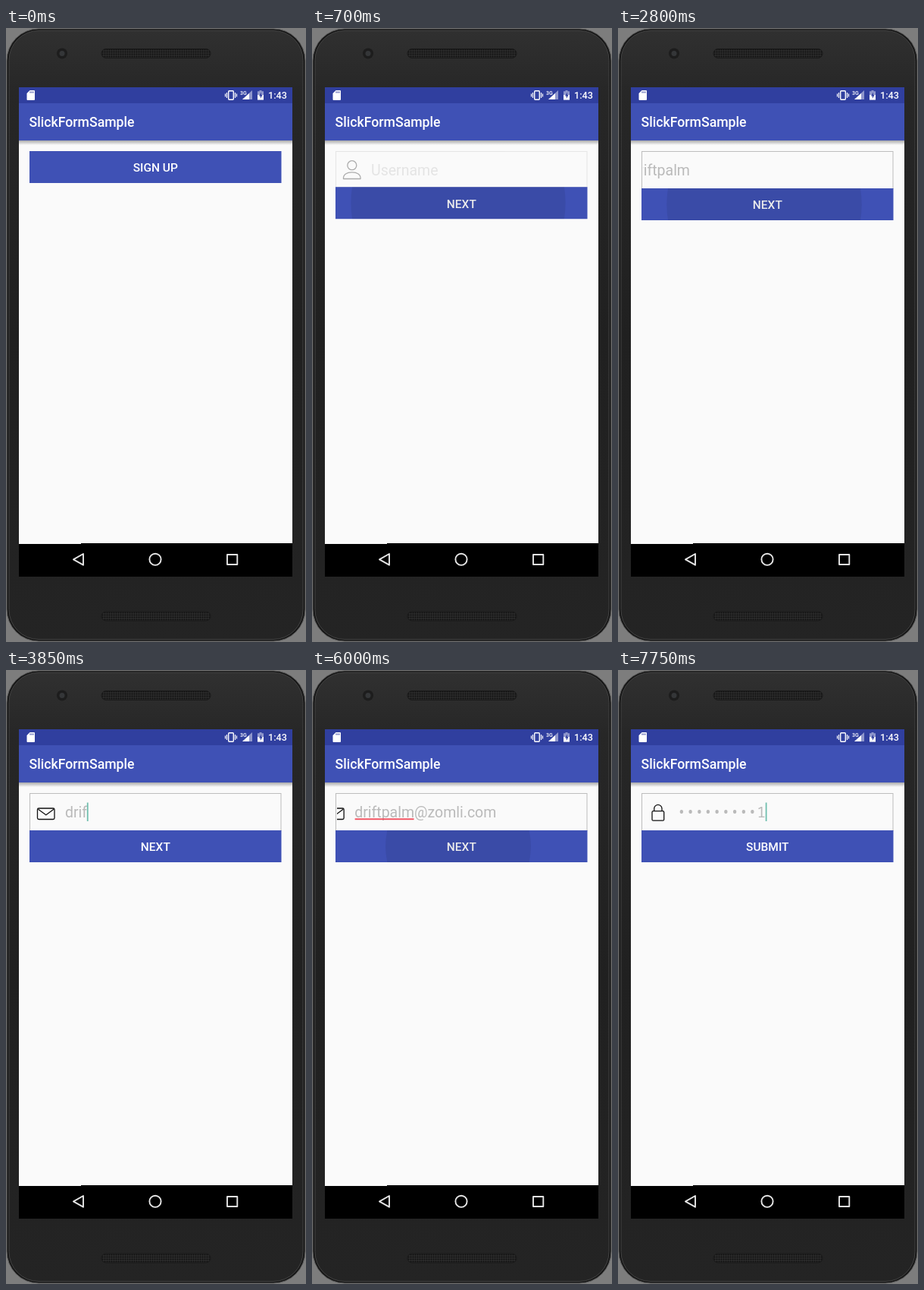
Animation, 396 px wide and 808 px high, one loop 8 s. Source, as an HTML page:

```html
<!DOCTYPE html>
<html lang="en">
<head>
<meta charset="utf-8">
<title>Sign-up form</title>
<style>
html, body { margin: 0; width: 100%; height: 100%; overflow: hidden; background: #7d7d7d; }
svg { display: block; width: 396px; height: 808px; }
text { font-family: Roboto, sans-serif; white-space: pre; }
.bold { font-weight: 500; fill: #fff; }
.mono { font-family: "Noto Sans Mono", "DejaVu Sans Mono", monospace; }
.icon { fill: none; stroke: #111; stroke-width: 1.3; stroke-linejoin: round; }
.nav { fill: none; stroke: #e6e6e6; stroke-width: 1.9; stroke-linejoin: round; }
</style>
</head>
<body>
<svg viewBox="0 0 396 808">
  <defs>
    <linearGradient id="body" x2="0" y2="1">
      <stop stop-color="#303030"/><stop offset=".1" stop-color="#272727"/>
      <stop offset=".5" stop-color="#202020"/><stop offset="1" stop-color="#242424"/>
    </linearGradient>
    <linearGradient id="shade" x2="0" y2="1">
      <stop stop-opacity=".32"/><stop offset="1" stop-opacity="0"/>
    </linearGradient>
    <pattern id="mesh" width="3" height="3" patternUnits="userSpaceOnUse">
      <rect width="3" height="3" fill="#2b2b2b"/><circle cx="1.5" cy="1.5" r="1.1" fill="#111"/>
    </pattern>
    <clipPath id="fieldClip"><rect x="33" y="163" width="329.5" height="47"/></clipPath>
    <clipPath id="buttonClip"><rect x="31" y="162" width="332.5" height="42"/></clipPath>
  </defs>

  <!-- phone -->
  <rect x="1" y="1" width="394" height="806" rx="42" fill="#161616" stroke="#5c5c5c"/>
  <rect x="4" y="3.5" width="388" height="801" rx="39" fill="url(#body)" stroke="#424242"/>
  <g fill="url(#mesh)" stroke="#191919">
    <rect x="126" y="27.5" width="144" height="12" rx="6"/>
    <rect x="126" y="768" width="144" height="12" rx="6"/>
  </g>
  <circle cx="74" cy="33.5" r="7" fill="#1d1d1d"/>
  <circle cx="74" cy="33.5" r="3.5" fill="#343638"/>

  <!-- screen -->
  <rect x="17" y="78" width="361" height="644" fill="#fafafa"/>
  <rect x="17" y="148" width="361" height="6" fill="url(#shade)"/>
  <rect x="17" y="99" width="361" height="49" fill="#3f51b5"/>
  <rect x="17" y="78" width="361" height="21" fill="#303f9f"/>
  <path d="M17 679H99V678H378V722H17Z"/>
  <text class="bold" x="30.5" y="130" font-size="17.7">SlickFormSample</text>

  <!-- status bar -->
  <path d="M31.5 82H37q1 0 1 1V94q0 1-1 1H28.500q-1 0-1-1V86Z" fill="#fff"/>
  <path d="M32 83.500v2M34 83.500v2M36 83.500v2" stroke="#303f9f"/>
  <g fill="none" stroke="#fff" stroke-width="1.4">
    <rect x="293.7" y="82.700" width="6.600" height="11.600" rx="1"/>
    <path d="M291.500 85v7M289.500 86.500v4M302.500 85v7M304.500 86.500v4" stroke-width="1.200"/>
  </g>
  <text class="bold" x="309" y="87.500" font-size="7">3G</text>
  <path d="M325 82V94H312Z" fill="#8f97cc"/>
  <path d="M321 86V94H312Z" fill="#fff"/>
  <path d="M334.500 82h3v1.300H340V94.500H332V83.300h2.500Z" fill="#8f97cc"/>
  <path d="M332 88H340V94.500H332Z" fill="#fff"/>
  <path d="M337 84.500 334 89.500h1.800V93L338.500 88h-1.700Z" fill="#303f9f"/>
  <text class="bold" x="346" y="93" font-size="12.600">1:43</text>

  <!-- navigation bar -->
  <g class="nav">
    <path d="M89 699.300 102 692V706.700Z"/>
    <circle cx="197" cy="699.300" r="7.600"/>
    <rect x="292" y="693" width="13.300" height="13"/>
  </g>

  <!-- form -->
  <g id="field">
    <rect id="frame" x="31.500" y="162.500" width="331.500" height="49" fill="none" stroke="#bdbdbd"/>
    <g clip-path="url(#fieldClip)">
      <g id="slide">
        <g class="icon">
          <g><circle cx="52.800" cy="180.700" r="6"/>
            <path d="M41.500 198.500C41 193 46 189.800 52.800 189.800S64.500 193 64 198.500Z"/></g>
          <g><rect x="41.500" y="182" width="22.500" height="14.500" rx="1.800"/>
            <path d="M42.500 183.300 52.800 190.800 63 183.300"/></g>
          <g><rect x="45" y="185.700" width="15.700" height="12.500" rx="1.500"/>
            <path d="M47.700 185.700v-3.200a5.150 5.150 0 0 1 10.300 0v3.200"/></g>
        </g>
        <text id="value" x="78" y="193.700" font-size="19.500" fill="#bababa"></text>
        <rect id="spell" x="78.500" y="195.300" height="1.900" fill="#f2505f"/>
        <rect id="caret" y="174.500" width="1.800" height="24.500" fill="#70bfae"/>
      </g>
    </g>
  </g>
  <g id="button">
    <rect x="31" y="162" width="332.500" height="42" fill="#3f51b5"/>
    <text id="label" class="bold" x="197.300" y="189.300" font-size="15.500" text-anchor="middle"></text>
    <g clip-path="url(#buttonClip)"><circle id="ripple" cx="193" cy="183"/></g>
  </g>
</svg>
<script>
const LOOP = 8000, WIDTH = 333, SLIDE = 160, NAME = 'driftpalm';
const $ = id => document.getElementById(id);
const set = (id, attrs) => { for (const k in attrs) $(id).setAttribute(k, attrs[k]); };
const clamp = x => Math.max(0, Math.min(1, x));

// slides[i] is when page i starts leaving; focus is when its caret first shows
const slides = [600, 2732, 5960];
const presses = [580, 2691, 5919];
const pages = [
  { label: 'SIGN UP' },
  { label: 'NEXT', hint: 'Username', text: NAME, focus: 800,
    keys: [1100, 1200, 1300, 1400, 1500, 1550, 1650, 1800, 1950] },
  { label: 'NEXT', hint: 'Email', text: NAME + '@zomli.com', focus: 2800,
    keys: [3500, 3600, 3650, 3800, 3900, 4000, 4050, 4150, 4250, 4350,
           4500, 4600, 4700, 4800, 4900, 5050, 5200, 5250, 5350] },
  { label: 'SUBMIT', hint: 'Password', text: NAME + '1', focus: 6050, secret: true,
    keys: [6700, 6900, 7000, 7050, 7150, 7300, 7400, 7500, 7600, 7750] }
];
const icons = document.querySelector('.icon').children;

function slideOffset(t) {
  for (const start of slides.slice(1)) {
    const p = (t - start) / SLIDE;
    if (p > 0 && p < 1) return -WIDTH * p * p;
    if (p >= 1 && p < 2) return WIDTH * (2 - p) ** 2;
  }
  return 0;
}

function drawRipple(t) {
  const age = t - (presses.findLast(p => p <= t) ?? -LOOP);
  set('ripple', { r: Math.min(185, 1.17 * age), opacity: 0.08 * clamp((550 - age) / 300) });
}

function drawField(page, index, t) {
  const typed = page.keys.filter(k => k <= t);
  const n = typed.length;
  const text = page.secret && n ? '•'.repeat(n - 1) + page.text[n - 1] : page.text.slice(0, n);
  const value = $('value');
  value.setAttribute('class', page.secret ? 'mono' : '');
  value.textContent = text || page.hint;
  const end = n ? value.getComputedTextLength() : 0;

  const blink = t - (n ? typed[n - 1] : page.focus);
  set('caret', { x: 77.7 + end, opacity: blink >= 0 && blink % 1000 < 500 ? 1 : 0 });

  const flagged = index === 2 && t >= 4500;
  set('spell', { width: flagged ? value.getSubStringLength(0, NAME.length) - 1 : 0 });
  for (let i = 0; i < icons.length; i++)
    icons[i].setAttribute('visibility', i === index - 1 ? 'visible' : 'hidden');
  set('slide', { transform: `translate(${slideOffset(t)})` });
}

function draw(t) {
  const index = t < slides[0] ? 0 : t < slides[1] + SLIDE ? 1 : t < slides[2] + SLIDE ? 2 : 3;
  const page = pages[index];
  const open = 49 * (1 - Math.cos(Math.PI * clamp((t - slides[0]) / 115))) / 2;
  $('label').textContent = page.label;
  set('button', { transform: `translate(0 ${open})` });
  set('frame', { height: open });
  set('field', { opacity: clamp((t - 635) / 200) });
  if (index) drawField(page, index, t);
  drawRipple(t);
}

const begin = performance.now();
function tick() {
  draw((performance.now() - begin) % LOOP);
  requestAnimationFrame(tick);
}
tick();
</script>
</body>
</html>
```
